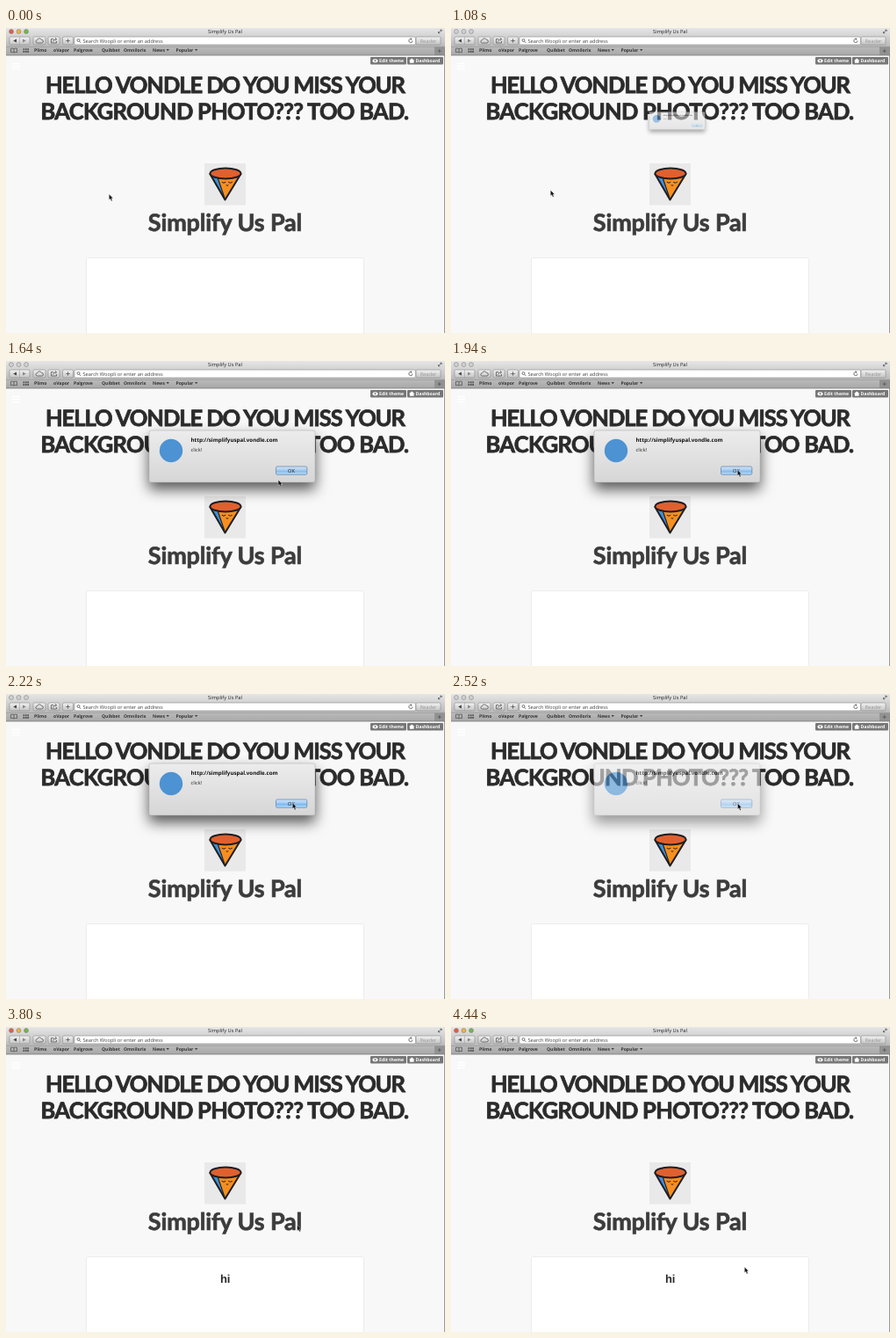
An HTML page that plays this animation: 500x347 px, repeating every 4.46 s.

```html
<!DOCTYPE html>
<html lang="en">
<head>
<meta charset="utf-8">
<title>Alert on a blog page</title>
<style>
html, body { margin: 0; width: 100%; height: 100%; overflow: hidden; background: #f8f8f8; }
svg { display: block; width: 500px; height: 347px; text-rendering: geometricPrecision; }
text { font: 5.7px "Open Sans", "Noto Sans", sans-serif; fill: #222; }
.bar text { font-size: 5.1px; font-weight: 700; fill: #333; }
.pill text { font-size: 5.15px; font-weight: 700; fill: #fff; }
.head { font: 700 25.5px Lato, sans-serif; fill: #2b2b2b; stroke: #2b2b2b; stroke-width: .8; text-anchor: middle; }
.name { font: 700 27px Lato, sans-serif; fill: #3c3c3c; stroke: #3c3c3c; stroke-width: .7; letter-spacing: -.15px; text-anchor: middle; }
.mid { text-anchor: middle; }
.btn rect { fill: url(#button); stroke: #888; stroke-width: .6; }
.icon { fill: none; stroke: #555; stroke-width: .8; }
#hi { font: 700 13px "Liberation Sans", Arial, sans-serif; fill: #2b2b2b; }
#panel { filter: drop-shadow(0 8px 8px rgba(0, 0, 0, .65)); }
</style>
</head>
<body>
<svg viewBox="0 0 500 347">
  <defs>
    <linearGradient id="chrome" x2="0" y2="1"><stop stop-color="#e6e6e6"/><stop offset=".65" stop-color="#bcbcbc"/><stop offset="1" stop-color="#a8a8a8"/></linearGradient>
    <linearGradient id="button" x2="0" y2="1"><stop stop-color="#f2f2f2"/><stop offset="1" stop-color="#c4c4c4"/></linearGradient>
    <linearGradient id="sheet" x2="0" y2="1"><stop stop-color="#ececec"/><stop offset="1" stop-color="#d6d6d6"/></linearGradient>
    <linearGradient id="blue" x2="0" y2="1"><stop stop-color="#d3e6f8"/><stop offset=".48" stop-color="#9cc8f2"/><stop offset=".52" stop-color="#74b2ee"/><stop offset="1" stop-color="#b5e0fb"/></linearGradient>
  </defs>

  <!-- page -->
  <rect width="500" height="347" fill="#f8f8f8"/>
  <path d="M499.5 31v316" stroke="#999"/>
  <path d="M7 40.5h9M7 43.5h9M7 46.5h9" stroke="#fff" stroke-width="1.5"/>
  <text class="head" x="249.5" y="73.7" letter-spacing="-1.05">HELLO VONDLE DO YOU MISS YOUR</text>
  <text class="head" x="249" y="103.7" letter-spacing="-.72">BACKGROUND PHOTO??? TOO BAD.</text>
  <g stroke-linejoin="round" stroke-linecap="round">
    <rect x="226" y="154" width="47" height="47.5" fill="#e9e9ea"/>
    <path d="M232.3 166L249.5 195.5 267.5 166Z" fill="#f78f20"/>
    <path d="M232.3 166L249.5 195.5 241.5 171Z" fill="#3f8fd4"/>
    <path d="M241.5 171.5L249.5 195" stroke="#1e1e22" stroke-width="1.1"/>
    <path d="M232.3 166L249.5 195.5 267.5 166" fill="none" stroke="#1e1e22" stroke-width="2"/>
    <ellipse cx="250" cy="165.5" rx="17.5" ry="6" fill="#e0612f" stroke="#1e1e22" stroke-width="1.9"/>
    <path d="M246 175.5q2 1.8 4 0M253.5 175.5q2 1.8 4 0M251 179q1 .8 2 0" fill="none" stroke="#1e1e22"/>
  </g>
  <text class="name" x="249.5" y="231">Simplify Us Pal</text>
  <rect x="91.5" y="261.5" width="316" height="100" rx="2" fill="#fff" stroke="#ececec"/>
  <text id="hi" class="mid" x="249.7" y="290.7">hi</text>

  <!-- page controls -->
  <g class="pill">
    <rect x="415" y="33" width="41" height="8.5" rx="1" fill="#777"/>
    <rect x="457" y="33" width="41" height="8.5" rx="1" fill="#777"/>
    <ellipse cx="420.5" cy="37.2" rx="3" ry="2" fill="#fff"/><circle cx="420.5" cy="37.2" r="1" fill="#777"/>
    <path d="M459 37.3l3.2-2.8 3.2 2.8h-.9v2.4h-4.6v-2.4z" fill="#fff"/>
    <text x="425" y="39.1">Edit theme</text>
    <text x="466.5" y="39.1">Dashboard</text>
  </g>

  <!-- browser window -->
  <rect width="500" height="31" fill="url(#chrome)"/>
  <rect x="488" y="21.5" width="12" height="9.5" fill="#929292"/>
  <path d="M0 31h500" stroke="#777" stroke-width=".8"/>
  <path d="M0 21.3h500" stroke="#8f8f8f" stroke-width=".6"/>
  <g stroke="#777" stroke-width=".5">
    <circle class="light" cx="6" cy="4" r="2.5"/>
    <circle class="light" cx="14.5" cy="4" r="2.5"/>
    <circle class="light" cx="23" cy="4" r="2.5"/>
  </g>
  <text class="mid" x="249.5" y="6.2">Simplify Us Pal</text>
  <path d="M492.5 5.8l3.6-3.6m-1.8 0h1.8v1.8M492.5 4v1.8h1.8" class="icon"/>
  <g class="btn">
    <rect x="4" y="10" width="23" height="9" rx="1.5"/>
    <rect x="31" y="10" width="14" height="9" rx="1.5"/>
    <rect x="48" y="10" width="13" height="9" rx="1.5"/>
    <rect x="64.5" y="10" width="12" height="9" rx="1.5"/>
    <rect x="467" y="10" width="28" height="9" rx="1.5"/>
  </g>
  <path d="M15.5 10v9" stroke="#999" stroke-width=".5"/>
  <path d="M12 12.5v4l-3.8-2z" fill="#444"/>
  <path d="M19 12.5v4l3.8-2z" fill="#888"/>
  <path d="M35.5 17a1.6 1.6 0 0 1 0-3.2 2.6 2.6 0 0 1 4.9-.4 1.8 1.8 0 0 1 .4 3.6z" class="icon"/>
  <path d="M54 12.5h-2.5V17h6v-2M53.5 15.5q0-2.8 4-2.8m-1.4-1.4l1.5 1.4-1.5 1.4M70.5 12.3v4.4M68.3 14.5h4.4" class="icon"/>
  <rect x="78" y="10" width="388.5" height="9" rx="1.5" fill="#fff" stroke="#888" stroke-width=".6"/>
  <circle cx="82.5" cy="14" r="1.5" class="icon"/><path d="M83.6 15.2l1.7 1.8" class="icon"/>
  <text x="87.5" y="16.7" style="fill:#444">Search Woopli or enter an address</text>
  <path d="M463 14.5a2.1 2.1 0 1 1-1.2-1.9m-1-1.2l1.4 1.2-1.4 1.2" class="icon"/>
  <text class="mid" x="481" y="16.7" style="fill:#999">Reader</text>
  <path d="M9 23.8q-1.7-1.2-3.5-.4v4.2q1.8-.7 3.5.4 1.7-1.1 3.5-.4v-4.2q-1.8-.8-3.5.4v4.2" class="icon"/>
  <path d="M19.5 24.2h6.5M19.5 27h6.5" stroke="#555" stroke-width="2" stroke-dasharray="1.7 .7"/>
  <g class="bar">
    <text x="32" y="27">Plimo</text>
    <text x="54" y="27">oVapor</text>
    <text x="77" y="27">Palgrove</text>
    <text x="109" y="27">Quibbet</text>
    <text x="134" y="27">Omnilorix</text>
    <text x="167" y="27">News</text>
    <text x="193.5" y="27">Popular</text>
  </g>
  <path d="M182.5 24h3.4l-1.7 2.3zM215 24h3.4l-1.7 2.3z" fill="#444"/>
  <path d="M493.7 24.2v4M491.7 26.2h4" class="icon"/>

  <!-- alert -->
  <g id="panel">
    <rect x="163" y="79" width="189" height="59" rx="2" fill="url(#sheet)" stroke="#aaa" stroke-width=".5"/>
    <circle cx="188" cy="102" r="13.2" fill="#4d92d2"/>
    <text x="210.5" y="92.3" style="font-weight:700;font-size:6.2px;fill:#111">http://simplifyuspal.vondle.com</text>
    <text x="210.5" y="102.8" style="font-size:5.6px">click!</text>
    <rect id="ok" x="307.5" y="120" width="35.3" height="9.3" rx="1.6" fill="url(#blue)" stroke="#5b7fae" stroke-width=".7"/>
    <text class="mid" x="325" y="126.9">OK</text>
  </g>

  <path id="cursor" d="M0 0v6.6l1.5-1.3 1.1 2.6 1.3-.6-1.1-2.5h2z" fill="#111" stroke="#fff" stroke-width=".4"/>
</svg>
<script>
const LOOP = 4460, OPEN = 1060, CLOSE = 2460;
const $ = s => document.querySelector(s);
const panel = $('#panel'), ok = $('#ok'), hi = $('#hi'), cursor = $('#cursor');
const lights = [...document.querySelectorAll('.light')];
const colours = ['#ea5a48', '#f2b03f', '#74b84c'];

// time, x, y of the pointer tip
const path = [
  [0, 117.3, 189], [560, 117.3, 189], [600, 113.3, 184.7], [1330, 113.3, 184.3],
  [1430, 160, 172], [1540, 256, 148], [1640, 310, 135.3], [1780, 323, 126.5],
  [1900, 326.3, 124], [2400, 326.3, 124], [2900, 327, 126], [3340, 327, 126],
  [3460, 328, 141], [3740, 331, 212], [4000, 333.6, 268], [4120, 334.3, 273], [LOOP, 334.3, 273]
];

const ramp = (t, start, length) => Math.min(1, Math.max(0, (t - start) / length));

function pointer(t) {
  const i = path.findIndex(p => p[0] > t);
  const [t0, x0, y0] = path[i - 1], [t1, x1, y1] = path[i];
  const k = (t - t0) / (t1 - t0);
  return [x0 + (x1 - x0) * k, y0 + (y1 - y0) * k];
}

function draw(t) {
  const grow = ramp(t, OPEN, 180), fade = ramp(t, CLOSE, 160);
  const scale = .2 + .8 * (1 - (1 - grow) ** 1.5);
  const shown = t >= OPEN && fade < 1;
  panel.style.display = shown ? '' : 'none';
  panel.style.opacity = Math.min(1, .4 + 1.2 * grow) * (1 - fade);
  panel.setAttribute('transform', `translate(257.5 104) scale(${scale}) translate(-257.5 -104)`);
  ok.setAttribute('fill-opacity', .92 + .08 * Math.cos((t - 1280) / 150));
  lights.forEach((l, i) => l.setAttribute('fill', shown ? '#d0d0d0' : colours[i]));
  hi.style.opacity = ramp(t, 2660, 320);
  cursor.setAttribute('transform', `translate(${pointer(t)})`);
}

const start = performance.now();
function tick() {
  draw((performance.now() - start) % LOOP);
  requestAnimationFrame(tick);
}
tick();
</script>
</body>
</html>
```
